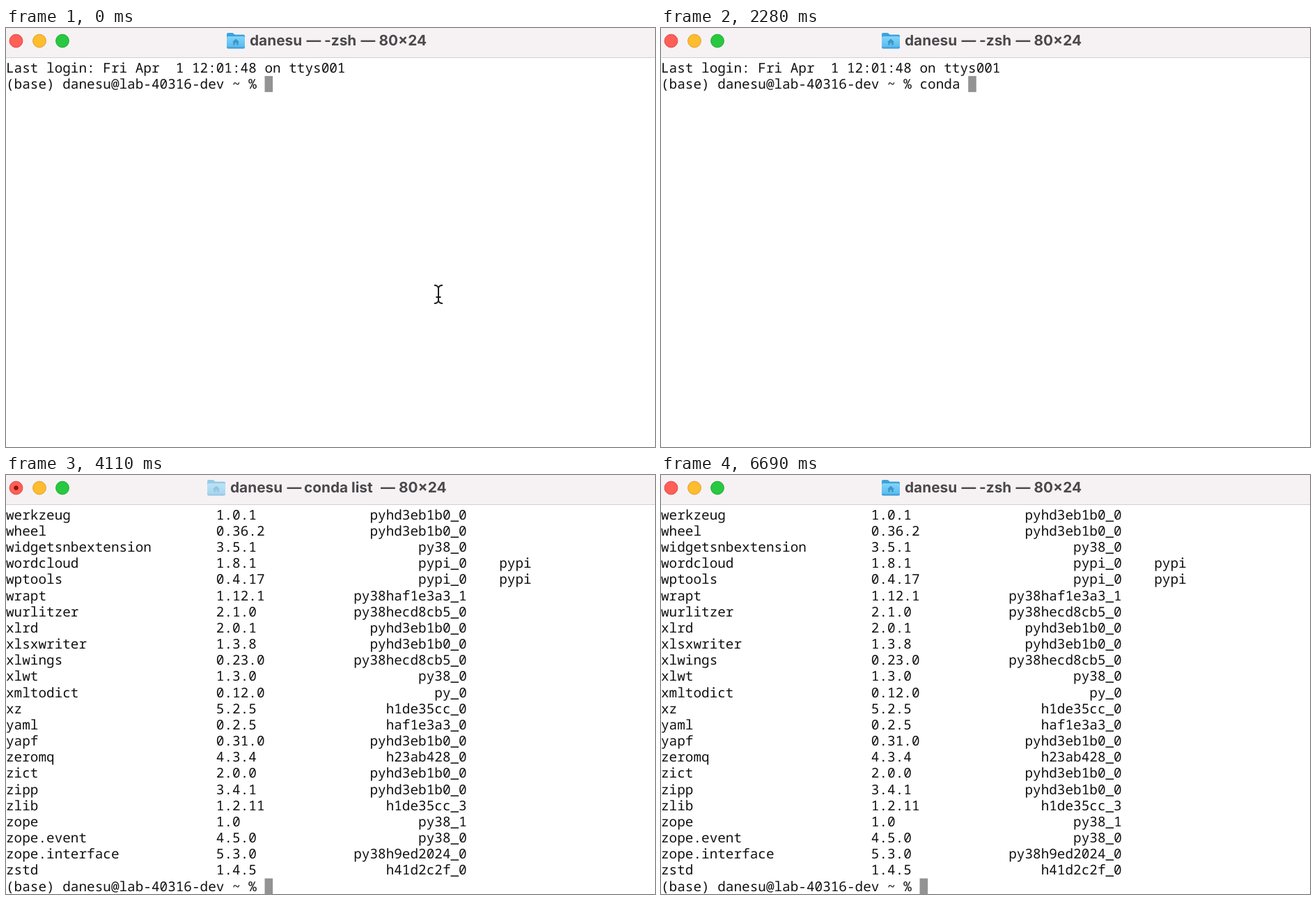
Animation of 932 by 601 pixels, one loop 7740 ms. Source, as an HTML page:

```html
<!DOCTYPE html>
<html lang="en">
<head>
<meta charset="utf-8">
<title>Terminal</title>
<style>
  html, body { margin: 0; width: 100%; height: 100%; overflow: hidden; background: #fff; }
  svg { display: block; width: 932px; height: 601px; }
  text { white-space: pre; text-rendering: geometricPrecision; }
  .mono { font: 500 19.35px "Noto Sans Mono", "DejaVu Sans Mono", monospace; fill: #111; font-variant-ligatures: none; }
  .title { font: 700 20.8px Inter, "Open Sans", sans-serif; fill: #4b484b; }
</style>
</head>
<body>
<svg viewBox="0 0 932 601">
  <defs>
    <linearGradient id="blue" x1="0" y1="0" x2="0" y2="1">
      <stop offset="0" stop-color="#84d3f8"/>
      <stop offset="1" stop-color="#55b9ec"/>
    </linearGradient>
  </defs>
  <rect width="932" height="601" fill="#fff"/>
  <g id="login"></g>
  <g id="list"></g>
  <rect id="caret" width="11.6" height="23" fill="#939393"/>
  <text id="command" class="mono"></text>

  <rect width="932" height="42" fill="#f6f2f4"/>
  <rect y="42" width="932" height="1" fill="#d3cfd1"/>
  <g stroke-width="1">
    <circle cx="14.5" cy="18.5" r="9.4" fill="#ff5f57" stroke="#e2473f"/>
    <circle cx="48" cy="18.5" r="9.4" fill="#febc2e" stroke="#e0a028"/>
    <circle cx="81" cy="18.5" r="9.4" fill="#28c840" stroke="#1cac31"/>
  </g>
  <circle id="dot" cx="14.5" cy="18.5" r="3.2" fill="#8a1710"/>
  <g id="folder">
    <path d="M0 9V3Q0 1 2 1H8Q9.5 1 10.5 2.5L11.5 3.5H24Q26 3.5 26 5.5V9Z" fill="#3ba3dc"/>
    <rect y="6" width="26" height="17.5" rx="2" fill="url(#blue)"/>
    <path d="M0 21v.5a2 2 0 0 0 2 2h22a2 2 0 0 0 2-2v-.5z" fill="#46a5d8"/>
    <path d="M13 9.5L18 14H16.8V18.5H14.2V15.5H11.8V18.5H9.2V14H8Z" fill="#3998cd"/>
  </g>
  <g id="shell"></g>
  <g id="busy"></g>
  <path id="pointer" fill="none" stroke="#1c1c1c" stroke-width="2"
    d="M-6 -13Q-1 -13 0 -9Q1 -13 6 -13M-6 13Q-1 13 0 9Q1 13 6 13M0 -9V9M-3.5 4H3.5"/>
</svg>
<script>
const LOOP = 7740, CELL = 11.61, ROW = 23.17, TOP = 45.7;
const user = "danesu";
const prompt = `(base) ${user}@lab-40316-dev ~ % `;
const word = "conda list";
const keyTimes = [1440, 1530, 1590, 1680, 1800, 2010, 2370, 2610, 2700, 2790];
const ENTER = 3060, RENAME = 3120, BUSY = 3960, OUTPUT = 4110, DONE = 4140;

const packages = `werkzeug 1.0.1 pyhd3eb1b0_0
wheel 0.36.2 pyhd3eb1b0_0
widgetsnbextension 3.5.1 py38_0
wordcloud 1.8.1 pypi_0 pypi
wptools 0.4.17 pypi_0 pypi
wrapt 1.12.1 py38haf1e3a3_1
wurlitzer 2.1.0 py38hecd8cb5_0
xlrd 2.0.1 pyhd3eb1b0_0
xlsxwriter 1.3.8 pyhd3eb1b0_0
xlwings 0.23.0 py38hecd8cb5_0
xlwt 1.3.0 py38_0
xmltodict 0.12.0 py_0
xz 5.2.5 h1de35cc_0
yaml 0.2.5 haf1e3a3_0
yapf 0.31.0 pyhd3eb1b0_0
zeromq 4.3.4 h23ab428_0
zict 2.0.0 pyhd3eb1b0_0
zipp 3.4.1 pyhd3eb1b0_0
zlib 1.2.11 h1de35cc_3
zope 1.0 py38_1
zope.event 4.5.0 py38_0
zope.interface 5.3.0 py38h9ed2024_0
zstd 1.4.5 h41d2c2f_0`.split("\n");

const el = Object.fromEntries([...document.querySelectorAll("g[id], rect[id], text[id], circle[id], path[id]")].map(n => [n.id, n]));

function addText(parent, kind, x, y, content) {
  const node = document.createElementNS("http://www.w3.org/2000/svg", "text");
  node.setAttribute("class", kind);
  node.setAttribute("x", x);
  node.setAttribute("y", y);
  node.textContent = content;
  parent.append(node);
}

const baseline = row => TOP + row * ROW + 18;
const cell = (parent, col, row, content) =>
  addText(parent, "mono", col * CELL, baseline(row), content);
const show = (node, on) => node.setAttribute("visibility", on ? "visible" : "hidden");
const move = (node, x, y) => node.setAttribute("transform", `translate(${x} ${y})`);

cell(el.login, 0, 0, "Last login: Fri Apr  1 12:01:48 on ttys001");
cell(el.login, 0, 1, prompt);
packages.forEach((line, row) => {
  const [name, version, build, channel] = line.split(" ");
  cell(el.list, 0, row, name);
  cell(el.list, 26, row, version);
  cell(el.list, 57 - build.length, row, build);
  if (channel) cell(el.list, 61, row, channel);
});
cell(el.list, 0, packages.length, prompt);
el.command.setAttribute("x", prompt.length * CELL);
el.command.setAttribute("y", baseline(1));

function addTitle(parent, parts) {
  for (const [x, content] of parts) addText(parent, "title", x, 25.3, content);
}
addTitle(el.shell, [[350, user], [431.5, "—"], [457, "-zsh"], [509.5, "—"], [535.5, "80×24"]]);
addTitle(el.busy, [[322, user], [403.5, "—"], [428, word], [538, "—"], [564, "80×24"]]);

const progress = (t, from, to) => Math.min(1, Math.max(0, (t - from) / (to - from)));
const smooth = p => p * p * (3 - 2 * p);

function draw(t) {
  const listed = t >= OUTPUT;
  const renamed = t >= RENAME && t < DONE;
  const busy = t >= BUSY && t < DONE;
  const typed = keyTimes.filter(k => t >= k).length;

  show(el.login, !listed);
  show(el.list, listed);
  show(el.command, !listed);
  el.command.textContent = word.slice(0, typed);

  const row = listed ? packages.length : t >= ENTER ? 2 : 1;
  const col = listed ? prompt.length : t >= ENTER ? 0 : prompt.length + typed;
  move(el.caret, col * CELL, TOP + row * ROW);

  show(el.shell, !renamed);
  show(el.busy, renamed);
  show(el.dot, busy);
  move(el.folder, renamed ? 289 : 317, 6);
  el.folder.setAttribute("opacity", busy ? 0.5 : 1);

  const away = smooth(progress(t, 1170, 1620));
  const nudge = smooth(progress(t, 3060, 3330));
  move(el.pointer, 621 + 321 * away - 5 * nudge, 382 - 301 * away);
  show(el.pointer, !listed);
}

const start = performance.now();
function tick() {
  draw((performance.now() - start) % LOOP);
  requestAnimationFrame(tick);
}
tick();
</script>
</body>
</html>
```
